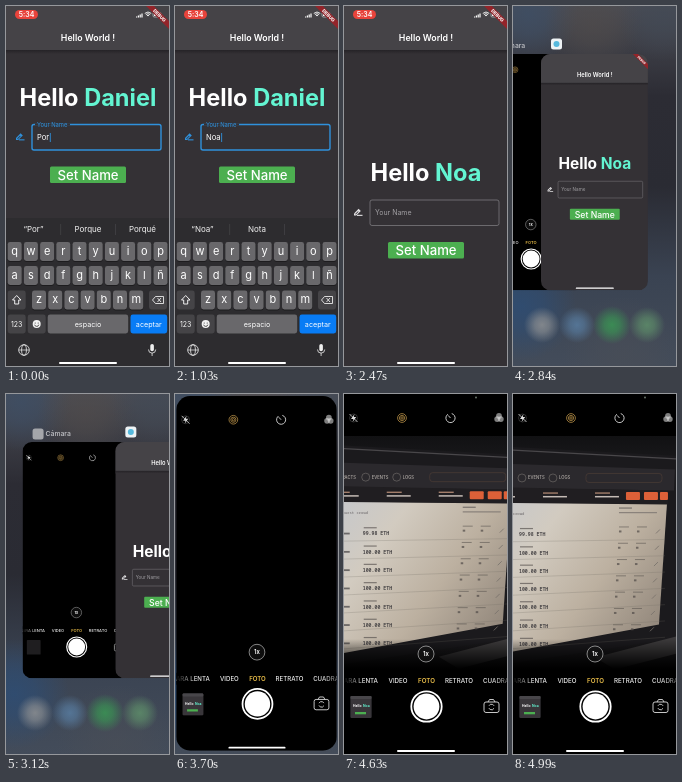
An HTML page with a canvas that plays this animation: 163x360 px, repeating every 5020 ms.

```html
<!DOCTYPE html>
<html lang="en">
<head>
<meta charset="utf-8">
<title>Hello World</title>
<style>
html, body { margin: 0; width: 100%; height: 100%; overflow: hidden; background: #000; }
canvas { display: block; width: 163px; height: 360px; }
</style>
</head>
<body>
<canvas id="stage"></canvas>
<script>
const W = 163, H = 360, LOOP = 5020;
const canvas = document.getElementById('stage');
const ratio = window.devicePixelRatio || 1;
canvas.width = W * ratio;
canvas.height = H * ratio;
const c = canvas.getContext('2d');

const lerp = (a, b, p) => a + (b - a) * p;
const ramp = (t, from, to) => Math.max(0, Math.min(1, (t - from) / (to - from)));
const easeOut = p => 1 - (1 - p) ** 3;
const easeInOut = p => p * p * (3 - 2 * p);

function rect(x, y, w, h, color, r = 0) {
  c.fillStyle = color;
  c.beginPath();
  c.roundRect(x, y, w, h, r);
  c.fill();
}
function outline(x, y, w, h, color, width = 1, r = 0) {
  c.strokeStyle = color;
  c.lineWidth = width;
  c.beginPath();
  c.roundRect(x, y, w, h, r);
  c.stroke();
}
function disc(x, y, r, color) {
  c.fillStyle = color;
  c.beginPath();
  c.arc(x, y, r, 0, 7);
  c.fill();
}
function arc(x, y, r, color, width = 0.8, from = 0, to = Math.PI * 2) {
  c.strokeStyle = color;
  c.lineWidth = width;
  c.beginPath();
  c.arc(x, y, r, from, to);
  c.stroke();
}
function line(color, width, ...pts) {
  c.strokeStyle = color;
  c.lineWidth = width;
  c.beginPath();
  for (let i = 0; i < pts.length; i += 2) c.lineTo(pts[i], pts[i + 1]);
  c.stroke();
}
function poly(color, ...pts) {
  c.fillStyle = color;
  c.beginPath();
  for (let i = 0; i < pts.length; i += 2) c.lineTo(pts[i], pts[i + 1]);
  c.fill();
}
function text(s, x, y, size, color = '#fff', align = 'center', weight = 400, family = 'Inter, sans-serif') {
  c.font = `${weight} ${size}px ${family}`;
  c.textAlign = align;
  c.textBaseline = 'alphabetic';
  c.fillStyle = color;
  c.fillText(s, x, y + size * 0.36);
  return c.measureText(s).width;
}
function scoped(draw) {
  c.save();
  draw();
  c.restore();
}
function shade(x0, y0, x1, y1, ...colors) {
  const g = c.createLinearGradient(x0, y0, x1, y1);
  colors.forEach((color, i) => g.addColorStop(i / (colors.length - 1), color));
  return g;
}
function card(x, y, scale, radius, draw) {
  scoped(() => {
    c.translate(x, y);
    c.scale(scale, scale);
    c.beginPath();
    c.roundRect(0, 0, W, H, radius);
    c.clip();
    draw();
  });
}

/* ---------- form app ---------- */

function statusBar() {
  rect(9, 4, 23, 9, '#e8433b', 4.5);
  text('5:34', 20.5, 8.5, 7, '#fff', 'center', 600);
  for (let i = 0; i < 4; i++) rect(130 + i * 1.8, 10.5 - i, 1.2, 1 + i, '#fff');
  for (let i = 1; i < 4; i++) arc(142, 11, i * 1.6, '#fff', 0.9, -2.3, -0.84);
  outline(147, 6.5, 8, 4.5, '#ddd', 0.6, 1.2);
  rect(148, 7.4, 5.5, 2.7, '#fff', 0.5);
}

function ribbon() {
  scoped(() => {
    c.translate(153.5, 9.5);
    c.rotate(Math.PI / 4);
    rect(-20, -2.8, 40, 5.6, '#93242a');
    text('DEBUG', 0, 0, 4.6, '#fff', 'center', 800);
  });
}

function pencil(y, color) {
  poly(color, 10, y + 3, 10, y + 1, 14.6, y - 3.8, 16.8, y - 1.6, 12.2, y + 3);
  poly('#343135', 11.2, y + 1.6, 14, y - 1.3, 14.6, y - 0.7, 11.8, y + 2.1);
  rect(13, y + 2.3, 5.5, 1.1, color);
}

function formField(t, y, focused, typed) {
  const blue = '#2f91dc';
  const rest = ramp(t, 1900, 2080);
  const edge = focused ? blue : '#858387';
  outline(26, y, 129, 25.5, edge, focused ? 1.4 : 0.7, 2);
  const size = lerp(5.8, 7, rest);
  const labelY = lerp(y, y + 12.8, easeInOut(rest));
  if (rest < 0.4) rect(29, y - 1, 35, 2, '#343135');
  text('Your Name', 31, labelY, size, focused ? blue : '#a19fa3', 'left');
  if (t < 1900) {
    const w = text(typed, 31, y + 13, 7.6, '#fff', 'left');
    if (focused) rect(31.6 + w, y + 8.5, 0.9, 9, blue);
  }
}

const KEY = '#69686b', DARK_KEY = '#454447';

function keyRow(letters, x, y) {
  [...letters].forEach((ch, i) => {
    const left = x + i * 16.2;
    rect(left, y + 0.8, 14, 19.2, '#1d1c1e', 2.4);
    rect(left, y, 14, 19, KEY, 2.4);
    text(ch, left + 7, y + 9, 11);
  });
}

function keyboard(y, hints) {
  scoped(() => {
    c.translate(0, y);
    rect(0, 0, W, 150, '#2d2c2f');
    hints.forEach((hint, i) => text(hint, 27.5 + i * 54.5, 11.5, 8, '#f2f2f2'));
    rect(54.5, 6, 0.6, 11, '#4b4a4d');
    rect(109, 6, 0.6, 11, '#4b4a4d');
    keyRow('qwertyuiop', 1.7, 24);
    keyRow('asdfghjklñ', 1.7, 48);
    keyRow('zxcvbnm', 26, 72.5);
    rect(1.7, 72.5, 18, 19, DARK_KEY, 2.4);
    c.lineJoin = 'round';
    line('#fff', 0.9, 6.5, 82, 10.7, 77.5, 15, 82, 12.7, 82, 12.7, 86, 8.7, 86, 8.7, 82, 6.5, 82);
    rect(143, 72.5, 18, 19, DARK_KEY, 2.4);
    line('#fff', 0.8, 146.5, 82, 149.5, 78.5, 157.5, 78.5, 157.5, 85.5, 149.5, 85.5, 146.5, 82);
    line('#fff', 0.8, 151.5, 80, 155, 84);
    line('#fff', 0.8, 155, 80, 151.5, 84);
    rect(1.7, 96.5, 18, 19, DARK_KEY, 2.4);
    text('123', 10.7, 106, 7);
    rect(21.7, 96.5, 18, 19, DARK_KEY, 2.4);
    disc(30.7, 106, 4, '#f4f4f4');
    disc(29.2, 105, 0.6, '#333');
    disc(32.2, 105, 0.6, '#333');
    arc(30.7, 106.2, 2.2, '#333', 0.8, 0.2, 2.9);
    rect(41.7, 96.5, 80.5, 19, KEY, 2.4);
    text('espacio', 82, 106, 7.2);
    rect(124.5, 96.5, 36.7, 19, '#087cf5', 2.4);
    text('aceptar', 142.8, 106, 7.2);
    arc(18, 132, 5.3, '#eee');
    c.beginPath();
    c.ellipse(18, 132, 2.4, 5.3, 0, 0, 7);
    c.stroke();
    line('#eee', 0.7, 12.7, 132, 23.3, 132);
    rect(144.3, 126, 3.6, 7.2, '#eee', 1.8);
    arc(146.1, 131.5, 3.6, '#eee', 0.8, 0, Math.PI);
    line('#eee', 0.8, 146.1, 135, 146.1, 138);
  });
}

function formApp(t) {
  const closed = easeInOut(ramp(t, 1250, 1580));
  const shift = 75.5 * closed;
  const focused = t < 1250;
  const typed = t < 350 ? 'Por' : t < 800 ? 'No' : 'Noa';
  const hints = {
    Por: ['“Por”', 'Porque', 'Porqué'],
    No: ['“No”', 'Nos', 'Nota'],
    Noa: ['“Noa”', 'Nota']
  }[typed];

  rect(0, 0, W, H, '#343135');
  rect(0, 44, W, 4, shade(0, 44, 0, 48, '#252327', '#343135'));
  rect(0, 0, W, 44, '#454347');
  if (t < 2580) statusBar();
  ribbon();
  text('Hello World !', 82, 32, 8.8, '#fff', 'center', 600);

  const name = t < 1900 ? 'Daniel' : 'Noa';
  c.font = '700 23.6px Inter, sans-serif';
  const helloW = c.measureText('Hello ').width;
  const left = 82 - (helloW + c.measureText(name).width) / 2;
  text('Hello ', left, 91.5 + shift, 23.6, '#fff', 'left', 700);
  text(name, left + helloW, 91.5 + shift, 23.6, '#63f5d2', 'left', 700);

  pencil(131 + shift, focused ? '#2f91dc' : '#e5e4e6');
  formField(t, 118.5 + shift, focused, typed);
  rect(44, 160.5 + shift, 76, 16.5, '#4caf50', 1.5);
  text('Set Name', 82, 169 + shift, 13.2, '#fff', 'center', 500);

  if (closed < 1) keyboard(212 + 150 * closed, hints);
  rect(53, 356, 58, 1.9, '#fff', 1);
}

/* ---------- camera ---------- */

const MONO = 'Noto Sans Mono, monospace';

function monitorHeader() {
  poly('#2b292d', -20, 68, 190, 75, 189, 96, -20, 93);
  [['CONTRACTS', 1], ['EVENTS', 43], ['LOGS', 74]].forEach(([label, x]) => {
    arc(x - 6, 83.5, 4, '#77736f', 0.6);
    text(label, x, 83.5, 4.2, '#b5afaa', 'left', 500);
  });
  outline(101, 79, 76, 9, '#4d3d35', 0.7, 3);
  poly('#201e21', -20, 92, 183, 96, 183, 110, -20, 108);
  for (const x of [6, 58, 110]) {
    rect(x, 98, 15, 1.2, '#b98f78');
    rect(x, 101.5, 24, 1.5, '#c4bbb5');
  }
  for (const x of [141, 159, 175]) rect(x, 97.5, x < 170 ? 14 : 8, 8, '#dc6038', 1);
}

function accountRow(i) {
  const y = 140 + i * 18.3;
  const slope = 1 + i * 2;
  line('rgba(110,105,100,.4)', 0.6, -20, y + 8, 180, y + 6 - slope);
  rect(-6, y - 1, 27, 1.8, 'rgba(75,72,74,.75)');
  rect(35, y - 6.5, 13, 1.2, 'rgba(90,85,82,.7)');
  text(i ? '100.00 ETH' : '99.98 ETH', 34, y, 4.9, '#4b4849', 'left', 600, MONO);
  for (const x of [134, 152]) {
    rect(x - i, y - 7 - slope, 10, 1, 'rgba(90,85,80,.6)');
    rect(x - i, y - 3 - slope, 2.5, 2, 'rgba(80,75,72,.7)');
  }
  line('#77706a', 0.8, 171 - i, y - slope, 175 - i, y - 4 - slope);
}

function monitorView(t) {
  const pan = -28 * (t - 4200) / 790;
  scoped(() => {
    c.beginPath();
    c.rect(0, 42, W, 233);
    c.clip();
    rect(0, 42, W, 233, shade(0, 42, 0, 275, '#111113', '#29282b', '#242326', '#151416'));
    c.translate(pan, Math.sin(t / 190) * 0.5);
    poly('#1b1a1d', -20, 50, 202, 62, 190, 244, -20, 276);
    line('#49474a', 1.2, -20, 53, 202, 65);
    poly('#3c3a3b', 110, 263, 215, 236, 215, 253, 130, 275);
    poly(shade(-10, 110, 165, 240, '#c3c7ce', '#d2cbc0', '#bcb0a0', '#94897d'),
      -20, 108, 182, 109, 174, 230, -20, 266);
    monitorHeader();
    text('cart burst crowd', 2, 119, 3.9, '#6d696b', 'left', 500, MONO);
    rect(134, 113, 13, 1.2, '#77706b');
    rect(134, 117.5, 38, 1.3, '#8a827b');
    for (let i = 0; i < 7; i++) accountRow(i);
  });
  rect(0, 245, W, 31, shade(0, 245, 0, 275, 'rgba(0,0,0,0)', '#000'));
  disc(132, 3.5, 0.9, '#748074');
}

function cameraIcons() {
  const white = '#dedede';
  arc(9.5, 24, 4, 'rgba(220,220,220,.4)', 0.5);
  poly(white, 10.5, 20, 7, 25, 9.4, 25, 8.6, 28, 12.2, 23, 9.8, 23);
  line(white, 0.8, 5.5, 20, 13.5, 28);
  for (const r of [1.2, 2.6, 4.4]) arc(58, 24, r, '#b58e47', 0.8);
  arc(106.5, 24, 4.6, white, 0.9, -1.3, 4.1);
  line(white, 0.9, 104.1, 21.4, 106.5, 24);
  for (let i = 0; i < 3; i++) {
    const a = -Math.PI / 2 + i * Math.PI * 2 / 3;
    disc(155 + Math.cos(a) * 2.1, 24 + Math.sin(a) * 2.1, 2.9, 'rgba(230,230,230,.55)');
  }
}

function thumbnail(shown) {
  rect(6.5, 302, 21, 22, '#1f1e20', 1);
  scoped(() => {
    c.globalAlpha = shown;
    rect(6.5, 302, 21, 22, '#39363a', 1);
    rect(6.5, 302, 21, 3, '#48464a', 1);
    text('Hello', 9, 312, 3.4, '#fff', 'left', 700);
    text('Noa', 19, 312, 3.4, '#63f5d2', 'left', 700);
    rect(11, 318, 11, 2.3, '#4caf50');
  });
}

function camera(t) {
  const active = ramp(t, 3410, 3600);
  rect(0, 0, W, H, '#000');
  const seen = ramp(t, 3960, 4080);
  if (seen > 0) scoped(() => {
    c.globalAlpha = seen;
    monitorView(t);
  });
  cameraIcons();
  disc(82, 260, 8, 'rgba(20,20,20,.65)');
  arc(82, 260, 8, '#bbb', 0.7);
  text('1x', 82, 260, 6, '#fff', 'center', 600);
  text('CÁMARA LENTA', 34, 287, 6.2, '#eee', 'right', 500);
  rect(0, 281, 20, 12, shade(0, 0, 20, 0, '#000', 'rgba(0,0,0,0)'));
  text('VIDEO', 54, 287, 6.2, '#eee', 'center', 500);
  text('FOTO', 82.5, 287, 6.2, '#e9bd49', 'center', 600);
  text('RETRATO', 115, 287, 6.2, '#eee', 'center', 500);
  text('CUADRADO', 139, 287, 6.2, '#eee', 'left', 500);
  rect(148, 281, 15, 12, shade(148, 0, 163, 0, 'rgba(0,0,0,0)', 'rgba(0,0,0,.6)'));
  thumbnail(active);
  arc(82.5, 312.5, 15.2, '#fff', 1.8);
  disc(82.5, 312.5, 12.9, '#fff');
  outline(140, 308, 15, 10.5, '#ddd', 0.9, 2);
  line('#ddd', 0.9, 144, 308, 145.5, 305.5, 149.5, 305.5, 151, 308);
  arc(147.5, 313, 2.8, '#ddd', 0.9, 0.5, 2.7);
  arc(147.5, 313, 2.8, '#ddd', 0.9, 3.6, 5.8);
  rect(53, 356, 58, 1.9, `rgba(255,255,255,${active})`, 1);
}

/* ---------- app switcher ---------- */

function blob(x, y, r, rgb, alpha = 0.85) {
  const g = c.createRadialGradient(x, y, 0, x, y, r);
  g.addColorStop(0, `rgba(${rgb},${alpha})`);
  g.addColorStop(0.4, `rgba(${rgb},${alpha * 0.75})`);
  g.addColorStop(1, `rgba(${rgb},0)`);
  rect(x - r, y - r, r * 2, r * 2, g);
}

function wallpaper() {
  rect(0, 0, W, H, shade(0, 0, 0, H, '#4a4c54', '#2c2c34', '#2a2b33', '#3a4352', '#434c5a'));
  blob(15, 8, 50, '62,78,100');
  blob(80, 18, 48, '82,76,74', 0.6);
  blob(150, 10, 45, '66,74,86', 0.7);
  blob(8, 300, 55, '44,78,120', 0.75);
  blob(110, 350, 60, '74,78,86', 0.6);
  blob(29, 319, 18, '142,144,146');
  blob(64, 319, 18, '88,124,160');
  blob(99, 319, 19, '58,150,84');
  blob(134, 319, 18, '94,142,106');
}

const CARD = 0.656, CARD_Y = 48, CARD_X = 28;

function switcher(t) {
  const shrink = easeInOut(ramp(t, 2530, 2840));
  const swipe = easeOut(ramp(t, 2920, 3380));
  const grow = easeOut(ramp(t, 3410, 3860));
  wallpaper();

  const camX = lerp(lerp(-88, -36, shrink), CARD_X, swipe);
  const appX = lerp(CARD_X * shrink, 127, swipe) + 70 * grow;
  const labels = shrink * (1 - ramp(grow, 0, 0.35));
  const scale = lerp(CARD, 1, grow);

  const drawCamera = () => card(lerp(camX, 0, grow), lerp(CARD_Y, 0, grow), scale, 14, () => camera(t));
  const drawApp = () => card(appX, CARD_Y * shrink, lerp(1, CARD, shrink), 14 * ramp(shrink, 0, 0.1), () => formApp(t));
  if (grow > 0) {
    drawApp();
    drawCamera();
  } else {
    drawCamera();
    drawApp();
  }

  scoped(() => {
    c.globalAlpha = labels;
    rect(camX + 10, 34.5, 11, 11, '#a4a6aa', 2.5);
    text('Cámara', camX + 23, 39.5, 6.8, '#c4c5c9', 'left', 500);
    rect(appX + 10, 32.5, 11, 11, '#eef3f5', 2.5);
    disc(appX + 15.5, 38, 3, '#55b9dd');
  });
}

function frame(now) {
  const t = now % LOOP;
  c.setTransform(ratio, 0, 0, ratio, 0, 0);
  if (t < 2530) formApp(t);
  else if (t < 3860) switcher(t);
  else camera(t);
  requestAnimationFrame(tick);
}

const start = performance.now();
const tick = () => frame(performance.now() - start);
tick();
</script>
</body>
</html>
```
